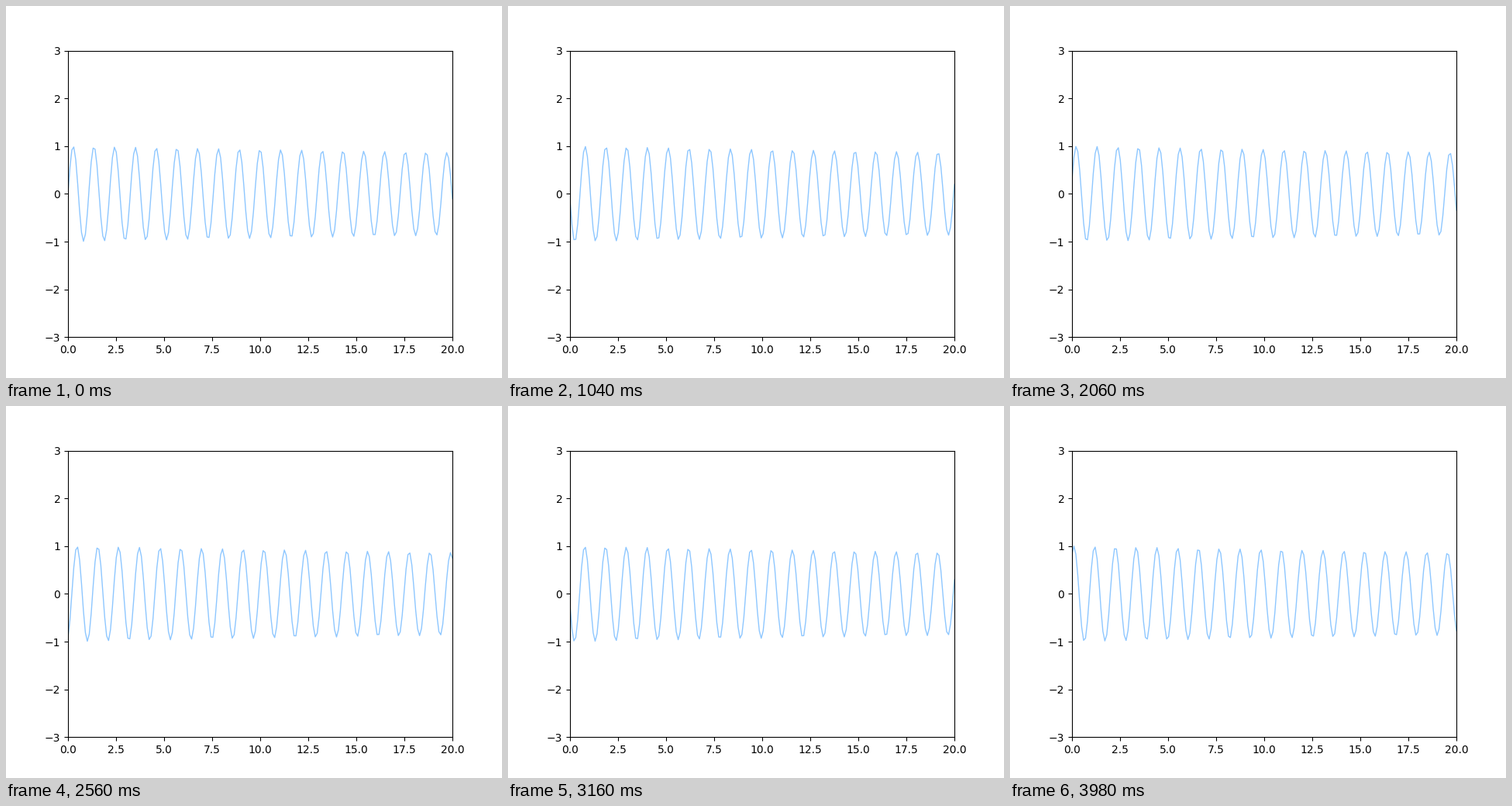
Recreate the animation shown at these times as a matplotlib script. Size 640x480 px, loop 4000 ms.

```python
import numpy as np
import matplotlib.pyplot as plt
from matplotlib.animation import FuncAnimation

FRAMES = 200
INTERVAL = 20        # ms
WAVELENGTH = 1.08
DECAY = 0.0073       # amplitude loss per unit length
STEP = 0.01          # distance travelled per frame

k = 2 * np.pi / WAVELENGTH
x = np.linspace(0, 20, 200)
envelope = np.exp(-DECAY * x)

fig, ax = plt.subplots(figsize=(6.4, 4.8), dpi=100)
ax.set_xlim(0, 20)
ax.set_ylim(-3, 3)
line, = ax.plot([], [], color="dodgerblue", alpha=0.5, lw=1)


def wave(i):
    """Damped sine wave moving to the right."""
    return envelope * np.sin(k * (x - STEP * i))


def update(i):
    line.set_data(x, wave(i))
    return line,


anim = FuncAnimation(fig, update, frames=FRAMES, interval=INTERVAL,
                     repeat=True, repeat_delay=0)
plt.show()
```
